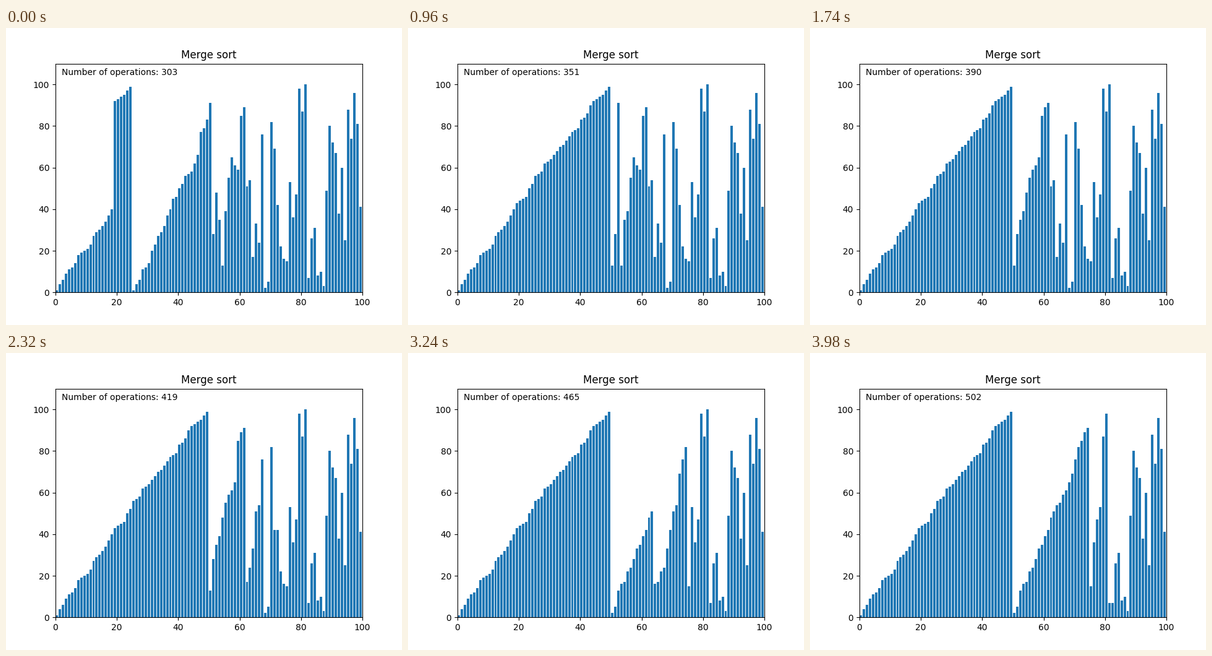
Write a matplotlib script that moves like this. It is 640 px wide and 480 px high and loops after 4000 ms.

```python
from itertools import islice

import matplotlib.pyplot as plt
from matplotlib.animation import FuncAnimation

N = 100
FIRST_OP = 303
FRAMES = 200

# The first quarter holds every value that the other three do not.
SECOND = [1, 4, 6, 11, 12, 14, 20, 23, 27, 29, 32, 37, 40,
          45, 46, 50, 52, 56, 57, 58, 62, 66, 77, 79, 83]
REST = [91, 28, 48, 35, 13, 39, 55, 65, 61, 59, 85, 89, 51,
        54, 17, 33, 24, 76, 2, 5, 82, 69, 42, 22, 16,
        15, 53, 36, 47, 98, 87, 100, 7, 26, 31, 8, 10,
        3, 49, 80, 72, 67, 38, 60, 25, 88, 74, 96, 81, 41]
FIRST = sorted(set(range(1, N + 1)) - set(SECOND + REST))


def merge_sort(a, lo, hi):
    """Sort a[lo:hi], yielding a copy after each write and each merge."""
    if hi - lo < 2:
        return
    mid = (lo + hi) // 2
    yield from merge_sort(a, lo, mid)
    yield from merge_sort(a, mid, hi)
    for i, value in enumerate(sorted(a[lo:hi]), lo):
        a[i] = value
        yield a[:]
    yield a[:]


steps = merge_sort(FIRST + SECOND + REST, 0, N)
states = list(islice(steps, FIRST_OP - 1, FIRST_OP - 1 + FRAMES))

fig, ax = plt.subplots(figsize=(6.4, 4.8), dpi=100)
ax.set_title("Merge sort")
bars = ax.bar(range(N), states[0], align="edge")
ax.set_xlim(0, N)
ax.set_ylim(0, 1.1 * N)
label = ax.text(0.02, 0.95, "", transform=ax.transAxes)


def update(frame):
    for bar, value in zip(bars, states[frame]):
        bar.set_height(value)
    label.set_text(f"Number of operations: {FIRST_OP + frame}")
    return [*bars, label]


anim = FuncAnimation(fig, update, frames=FRAMES, interval=20,
                     repeat=True, repeat_delay=0)
plt.show()
```
